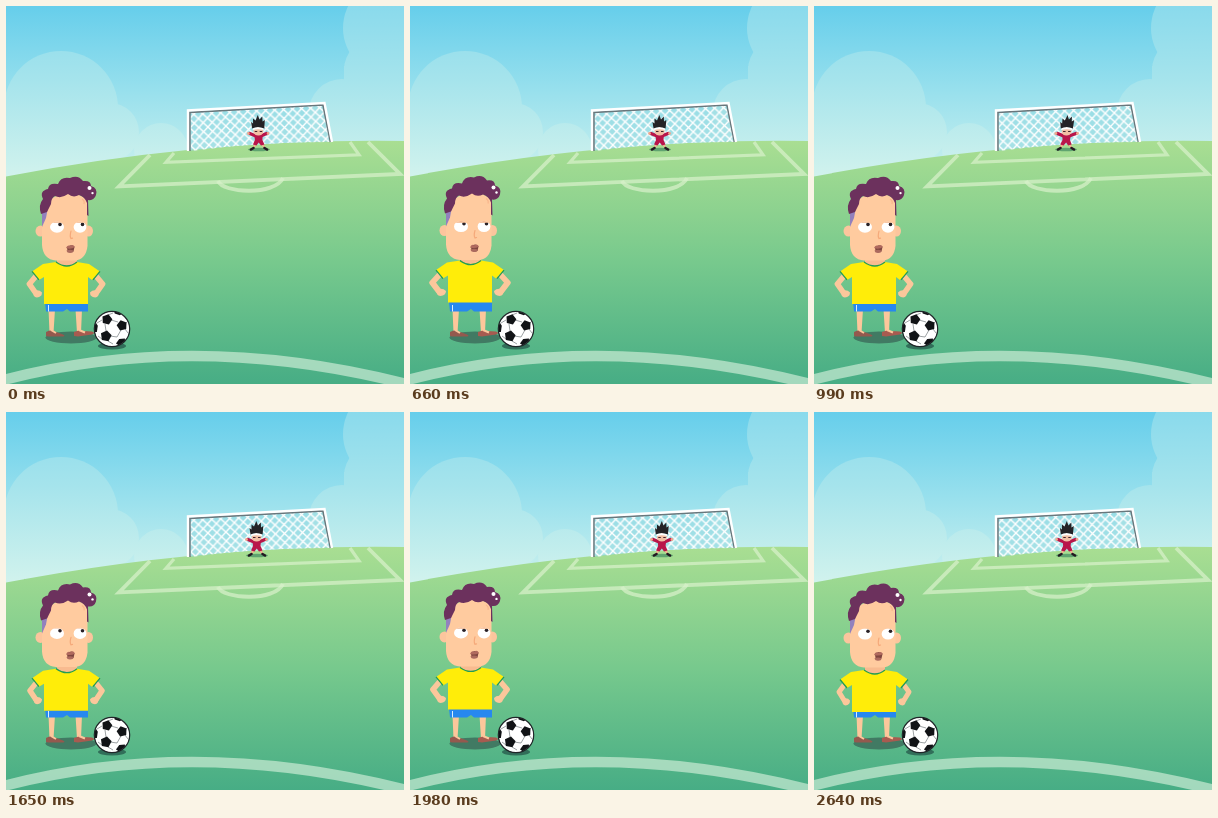
An HTML page for the animation above (2970 ms loop, 398x378 px).

```html
<!DOCTYPE html>
<html lang="en">
<head>
<meta charset="utf-8">
<title>Penalty kick</title>
<style>
@property --breath { syntax: "<number>"; inherits: true; initial-value: .6; }
@property --shift { syntax: "<number>"; inherits: true; initial-value: 0; }
@property --lean { syntax: "<number>"; inherits: true; initial-value: 0; }
html, body { margin: 0; width: 100%; height: 100%; overflow: hidden; background: #62cfec; }
svg { display: block; width: 100%; height: 100%; }

#player { animation: breathe 2970ms step-end infinite; }
#keeper { animation: guard 2970ms step-end infinite; }
#head { transform: translateY(calc(var(--breath) * -1.5px)); }
#torso { transform: translateY(calc(var(--breath) * -3.4px)); }
.arm { transform-origin: 36px 270px; transform: scaleX(calc(1 + var(--breath) * .25)); }
.lids { transform: translateY(calc(var(--breath) * 1.8px)); }
.lip { transform: translateY(calc((1 - var(--breath)) * 1.2px)); }
#keeper-body { transform: translateX(calc(var(--shift) * 1px)); }
#keeper-top { transform-origin: 253px 141px; transform: skewX(calc(var(--lean) * -1deg)); }
#reach { transform-origin: 250px 128px; transform: scaleX(calc(1 + var(--lean) * .02)); }

@keyframes breathe {
  0% { --breath: .6 }
  11.1111% { --breath: .9 }
  22.2222% { --breath: 1 }
  33.3333% { --breath: .6 }
  44.4444% { --breath: .1 }
  55.5556% { --breath: .4 }
  66.6667% { --breath: .75 }
  77.7778% { --breath: .8 }
  88.8889% { --breath: 0 }
  100% { --breath: .6 }
}
@keyframes guard {
  0% { --shift: 0; --lean: -1 }
  11.1111% { --shift: -2; --lean: -1 }
  22.2222% { --shift: -3; --lean: 0 }
  33.3333% { --shift: -1; --lean: 4 }
  44.4444% { --shift: 0; --lean: 7 }
  55.5556% { --shift: -2; --lean: 0 }
  66.6667% { --shift: -1; --lean: 1 }
  77.7778% { --shift: 0; --lean: 2.5 }
  88.8889% { --shift: 0; --lean: 1 }
  100% { --shift: 0; --lean: -1 }
}
</style>
</head>
<body>
<svg viewBox="0 0 398 378" preserveAspectRatio="none">
  <defs>
    <linearGradient id="sky" gradientUnits="userSpaceOnUse" x1="0" y1="0" x2="0" y2="170">
      <stop offset="0" stop-color="#66ceeb"/>
      <stop offset=".5" stop-color="#98e0ed"/>
      <stop offset="1" stop-color="#ccf1ee"/>
    </linearGradient>
    <linearGradient id="cloud" gradientUnits="userSpaceOnUse" x1="0" y1="0" x2="0" y2="168">
      <stop offset="0" stop-color="#8adaec"/>
      <stop offset=".45" stop-color="#a6e4ec"/>
      <stop offset="1" stop-color="#d0f2ed"/>
    </linearGradient>
    <linearGradient id="grass" gradientUnits="userSpaceOnUse" x1="0" y1="135" x2="0" y2="378">
      <stop offset="0" stop-color="#a9de92"/>
      <stop offset=".5" stop-color="#77c98d"/>
      <stop offset="1" stop-color="#47ad85"/>
    </linearGradient>
    <pattern id="mesh" width="9" height="9" patternUnits="userSpaceOnUse" patternTransform="translate(183 104) rotate(-3)">
      <path d="M-1 -1L10 10M-1 10L10 -1" stroke="#fff" stroke-width="1.4"/>
    </pattern>
    <clipPath id="ball-edge"><circle cx="106" cy="323" r="17.5"/></clipPath>
    <clipPath id="eyes">
      <ellipse cx="51" cy="222" rx="7" ry="5.6"/>
      <ellipse cx="74" cy="222" rx="6.4" ry="5.6"/>
    </clipPath>
    <path id="patch" d="M0-6L5.7-1.9 3.5 4.9-3.5 4.9-5.7-1.9Z"/>
  </defs>

  <rect width="398" height="378" fill="url(#sky)"/>
  <g fill="url(#cloud)">
    <circle cx="55" cy="102" r="57"/>
    <circle cx="104" cy="126" r="29"/>
    <circle cx="155" cy="144" r="27"/>
    <rect y="102" width="112" height="70"/>
    <circle cx="386" cy="22" r="49"/>
    <circle cx="370" cy="64" r="32"/>
    <circle cx="336" cy="106" r="33"/>
    <rect x="338" y="60" width="60" height="80"/>
  </g>

  <path d="M0 170.500Q200 132 398 135V378H0Z" fill="url(#grass)"/>

  <g fill="none" stroke="#d9f2cb" stroke-opacity=".72" stroke-width="3.800">
    <path d="M144 149L113 180.300 394 168 362 136"/>
    <path d="M168 147L160 156.300 353 148.800 344 136" stroke-width="3.200"/>
    <path d="M212 175C217 187.500 269 189.500 277 172"/>
    <path d="M-10 376Q188 322 408 380" stroke="#cfeed8" stroke-opacity=".68" stroke-width="10.500"/>
  </g>

  <g id="goal" fill="none">
    <path d="M184 107L317 99 324 136Q250 136 185 145Z" fill="#8ed6dc" fill-opacity=".45"/>
    <path d="M184 107L317 99 324 136Q250 136 185 145Z" fill="url(#mesh)"/>
    <path d="M183.800 145V106.300L317 98.800 324.500 136" stroke="#69777c" stroke-width="1.800"/>
    <path d="M182 145V104.500L318.500 97 326 136" stroke="#fff" stroke-width="2.400"/>
  </g>

  <g id="keeper">
    <g id="keeper-body">
      <ellipse cx="253" cy="143.500" rx="11" ry="1.800" fill="#4f9668" opacity=".8"/>
      <path d="M250 138L247 142M256 138L259 142" stroke="#f2b28f" stroke-width="2"/>
      <path d="M245 143.500L247.500 142M258.500 142L261 143.500" stroke="#211a20" stroke-width="2.600" stroke-linecap="round"/>
      <g id="keeper-top">
        <g id="reach">
          <path d="M250 130L244 127.500M255 130L261 127.500" stroke="#b9164a" stroke-width="3.200" stroke-linecap="round"/>
          <g fill="#f0a58b"><circle cx="242.500" cy="127.500" r="1.400"/><circle cx="262.500" cy="127.500" r="1.400"/></g>
        </g>
        <path d="M248.500 128H257L256.500 134 258.500 138.500 255 139.500 252.800 136.500 250.500 139.500 247 138.500 249 134Z" fill="#b9164a"/>
        <ellipse cx="252.600" cy="125.500" rx="5" ry="4" fill="#f1bfa4"/>
        <path d="M247 122Q252.500 120.500 258 122V124Q252.500 122.500 247 124Z" fill="#fff"/>
        <path d="M249 125.500H251.500M254 125.500H256.500" stroke="#40252c"/>
        <path d="M246.500 122.500L245.500 116 247.500 117.500 247.500 112.500 250 114.500 252.300 109 254 113.500 256.800 110.500 257 115.500 259.300 114 258.600 122.500Q252 119.500 246.500 122.500Z" fill="#242326"/>
      </g>
    </g>
  </g>

  <g id="player">
    <ellipse cx="65" cy="331.500" rx="25.500" ry="6" fill="#417a63"/>
    <path d="M42.500 303H49L47.500 327H43.500ZM69.500 303H76L75 327H71Z" fill="#fcc79b"/>
    <g id="shoes">
      <path d="M40 330V326Q45 323.500 49 325.500L57 328.500Q60 330 57 330.500H42Z" fill="#94594e"/>
      <path d="M68 330V326Q73 323.500 77 325L86 325.500Q90 327 86 328.500L72 330.500Z" fill="#a75b50"/>
      <path d="M45 324L50 327M73 324L79 326.500" stroke="#fcc79b" stroke-width="2"/>
    </g>
    <path d="M39 296H82V305.500H64L61 303 57 305.500H40Z" fill="#2788ef"/>
    <path d="M42.500 299V305.500" stroke="#d8eeff" stroke-width="1"/>

    <g id="torso">
      <path d="M51 248H71V259Q61 266 51 259Z" fill="#f8bb90"/>
      <g id="side">
        <g class="arm">
          <path d="M33 269L25 280 30.500 289" fill="none" stroke="#fcc79b" stroke-width="5" stroke-linejoin="round"/>
          <path d="M28 287Q33.500 285 36 288.500 36 293 31.500 293.500 28 293 28 287Z" fill="#fcc79b"/>
        </g>
      </g>
      <use href="#side" transform="matrix(-1 0 0 1 120 0)"/>
      <path d="M50 258L37 260 26 267.500 33 276 38 273V300H82V273L86 276 94 267.500 83 260 71 258Q61 265 50 258Z" fill="#ffed09"/>
      <path d="M26 267.500L33 276M94 267.500L87 276M50 258Q61 266 71 258" fill="none" stroke="#239b57" stroke-width="1.300"/>
    </g>

    <g id="head">
      <ellipse cx="34.500" cy="226" rx="5" ry="5.500" fill="#fcc59d"/>
      <ellipse cx="82.500" cy="226" rx="4.500" ry="5.500" fill="#fcc59d"/>
      <path d="M41 197L36 220V240Q37 254.500 50 255.500H69Q80 254.500 81.500 241V195Q62 180 41 197Z" fill="#ffcb9f"/>
      <path d="M36 207L42 202 40 213 36 222Z" fill="#9281bd"/>
      <path d="M35 209Q32 200 37 194 33 186 42 184 43 177 52 179 55 171 64 173 72 169 77 176 85 175 85 181 92 183 90 190 88 196 82 195L82.500 211 81 210V198Q79 192 73 190 67 193 62 189 55 194 49 191 45 193 45 199L41 207Z" fill="#6c315d"/>
      <g fill="#fff"><circle cx="83.500" cy="183" r="2"/><circle cx="86.500" cy="188" r="1.200"/></g>
      <path d="M76 194Q79 196 78 199" fill="none" stroke="#f9b68c" stroke-width="1.200"/>

      <g clip-path="url(#eyes)">
        <path d="M42 215H82V229H42Z" fill="#fff"/>
        <circle cx="54" cy="219.300" r="1.800" fill="#292126"/>
        <circle cx="76.500" cy="219.300" r="1.800" fill="#292126"/>
        <path class="lids" d="M42 210H82V216.500H42Z" fill="#f3b489"/>
      </g>
      <path d="M65 226Q63.500 231 65 233.500L66.500 233" fill="none" stroke="#f5a97a" stroke-width="1.200" stroke-linecap="round"/>
      <path d="M61 242.500Q65 238 68.500 242L67.500 246.500Q64 248 61.500 246Z" fill="#7e453f"/>
      <path d="M60 243Q61.500 239 64 241 67 238.500 69 242 65 244.500 60 243Z" fill="#b06a5e"/>
      <path class="lip" d="M60.500 245Q64 243.500 67.500 245 67.500 247.500 64 247.500 61 247.500 60.500 245Z" fill="#ab6a5e"/>
    </g>
  </g>

  <g id="ball">
    <ellipse cx="106" cy="340" rx="14" ry="3.500" fill="#316e59"/>
    <circle cx="106" cy="323" r="17.500" fill="#fff"/>
    <g clip-path="url(#ball-edge)">
      <path d="M105 314L112 316M115 324L111 331 104 330M100 325L99 318M102 309L107 307M96 314L91 317M120 317L123 314M119 323L122 327M96 333L92 330M102 335L107 338" fill="none" stroke="#868c8e" stroke-width=".8"/>
      <g fill="#111316">
        <use href="#patch" transform="translate(101 313.500) rotate(15) scale(.9)"/>
        <use href="#patch" transform="translate(116 319.500) rotate(-15) scale(.9)"/>
        <use href="#patch" transform="translate(100 330) rotate(10) scale(.95)"/>
        <use href="#patch" transform="translate(112 306.500) rotate(20) scale(.8 .4)"/>
        <use href="#patch" transform="translate(89.500 321.500) scale(.4 .9)"/>
        <use href="#patch" transform="translate(115 336) rotate(-30) scale(.9 .6)"/>
      </g>
    </g>
    <circle cx="106" cy="323" r="17.700" fill="none" stroke="#202629" stroke-width="1.200"/>
  </g>
</svg>
</body>
</html>
```
